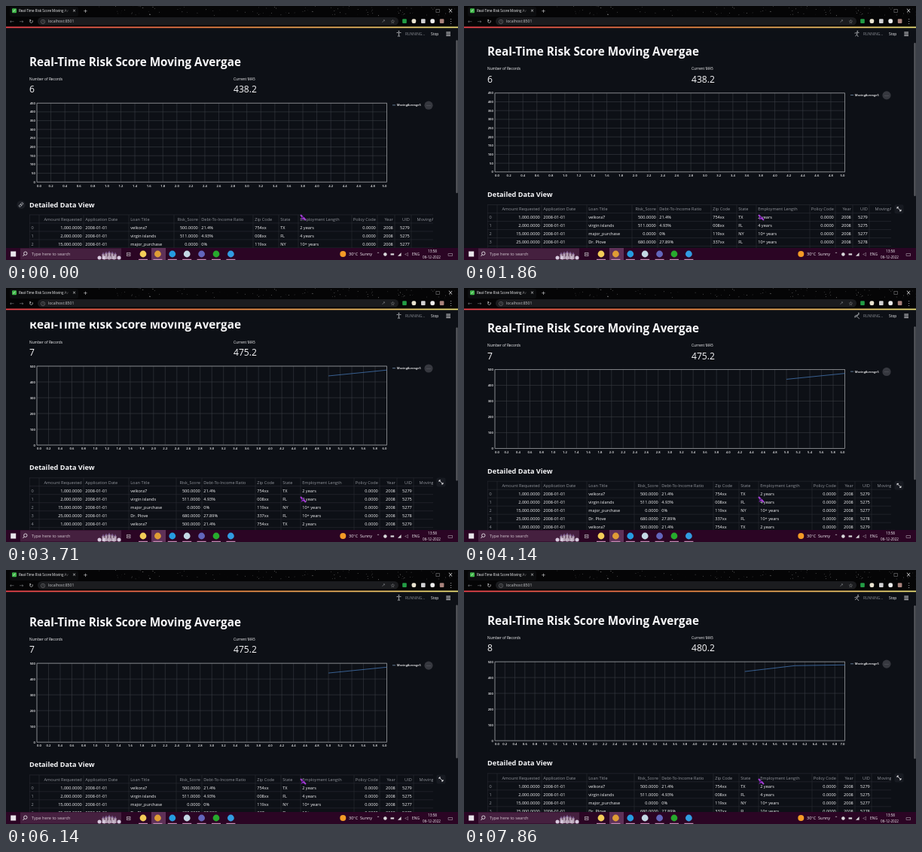
These frames come from a looping animation (600 px wide and 338 px high, 8000 ms). An HTML page with a canvas:

```html
<!DOCTYPE html>
<html lang="en">
<head>
<meta charset="utf-8">
<title>Risk score dashboard</title>
<style>
html, body { margin: 0; width: 100%; height: 100%; overflow: hidden; background: #0d1016; }
canvas { display: block; width: 100vw; height: 100vh; }
</style>
</head>
<body>
<canvas id="stage"></canvas>
<script>
const W = 600, H = 338, LOOP = 8000, STEPS = 56;
const BG = '#0d1016', WHITE = '#f8f8fa', GRAY = '#92959c', RULE = '#2a2d35';
const canvas = document.getElementById('stage');
const ctx = canvas.getContext('2d');
const ratio = window.devicePixelRatio || 1;
canvas.width = W * ratio;
canvas.height = H * ratio;
ctx.scale(ratio, ratio);

// Scroll turning points: [step, y]
const scrollKeys = [[0, 0], [9, -6.6], [19, -23.5], [26, -25.2], [34, -13.3], [43, -5.1], [48, -7.1], [STEPS, -7.1]];
const averages = [438.2, 475.2, 480.2];

const headings = 'Amount Requested|Application Date|Loan Title|Risk_Score|Debt-To-Income Ratio|Zip Code|State|Employment Length|Policy Code|Year|UID|MovingAverage5'.split('|');
const records = [
  '1,000.0000|2008-01-01|velkora7|500.0000|21.4%|754xx|TX|2 years|0.0000|2008|5279',
  '2,000.0000|2008-01-01|virgin islands|511.0000|4.93%|008xx|FL|4 years|0.0000|2008|5275',
  '15,000.0000|2008-01-01|major_purchase|0.0000|0%|119xx|NY|10+ years|0.0000|2008|5277',
  '25,000.0000|2008-01-01|Dr. Plove|680.0000|27.89%|337xx|FL|10+ years|0.0000|2008|5278'
].map(row => row.split('|'));
const columnEdges = [44, 103, 163, 223, 257, 328, 362, 388, 459, 493, 516, 538, 591];
const isNumeric = heading => /Amount|Score|Policy|Year|UID|Average/.test(heading);

const apps = ['#f3cc58', '#df9d35', '#259be0', '#c3d8e4', '#6266bc', '#27a92d', '#319ce2'];
const extensions = ['#239c45', '#e9e3d0', '#d0d0d2', '#eeeeee', '#a9837c'];

function text(str, x, y, size, { color = WHITE, align = 'left', weight = 400 } = {}) {
  ctx.font = `${weight} ${size}px "Open Sans", "Noto Sans", sans-serif`;
  ctx.fillStyle = color;
  ctx.textAlign = align;
  ctx.fillText(str, x, y + size * 0.36);
}

function glyph(symbol, x, y, size = 7, color = '#d8d8da') {
  ctx.font = `${size}px "DejaVu Sans", sans-serif`;
  ctx.fillStyle = color;
  ctx.textAlign = 'center';
  ctx.fillText(symbol, x, y + size * 0.36);
}

function rect(x, y, w, h, color, radius = 0) {
  ctx.fillStyle = color;
  ctx.beginPath();
  ctx.roundRect(x, y, w, h, radius);
  ctx.fill();
}

const dot = (x, y, r, color) => rect(x - r, y - r, 2 * r, 2 * r, color, r);

function line(color, width, ...points) {
  ctx.strokeStyle = color;
  ctx.lineWidth = width;
  ctx.beginPath();
  for (const [x, y] of points) ctx.lineTo(x, y);
  ctx.stroke();
}

function gradient(x0, x1, ...colors) {
  const fill = ctx.createLinearGradient(x0, 0, x1, 0);
  colors.forEach((color, i) => fill.addColorStop(i / (colors.length - 1), color));
  return fill;
}

function scrollAt(step) {
  const i = scrollKeys.findIndex(key => key[0] > step);
  const [s0, y0] = scrollKeys[i - 1], [s1, y1] = scrollKeys[i];
  return y0 + (y1 - y0) * (step - s0) / (s1 - s0);
}

function drawBrowser() {
  rect(0, 0, W, 28, '#050506');
  let seed = 7;
  const random = () => (seed = seed * 16807 % 2147483647) / 2147483647;
  for (let i = 0; i < 120; i++) {
    dot(W * (1 - 0.8 * random() ** 1.3), random() * 13, 0.45, `rgba(255,255,255,${random() * 0.7})`);
  }
  rect(5, 1, 91, 13, '#0c0d0f', 3);
  rect(8, 3.2, 6, 6, '#3fb649', 1);
  glyph('✓', 11, 6.2, 5.5, '#fff');
  text('Real-Time Risk Score Moving Av', 17, 6.3, 4.5);
  rect(74, 2, 13, 9, gradient(74, 86, '#0c0d0f00', '#0c0d0f'));
  glyph('×', 90.5, 6.3, 6);
  glyph('+', 105.5, 6.3);
  glyph('□', 573, 6.3, 6);
  glyph('×', 590, 6.3, 8);

  rect(42, 15, 479, 10.5, '#1b1c1f', 5.2);
  glyph('←', 8, 20, 7, '#77797d');
  glyph('→', 20.5, 20, 7, '#77797d');
  glyph('↻', 33.5, 20);
  glyph('ⓘ', 49, 20, 5.5);
  text('localhost:8501', 56, 20, 5.1, { color: '#c5c6c9' });
  glyph('↗', 501, 20, 6, '#888a8e');
  glyph('☆', 513.3, 20);
  extensions.forEach((color, i) => rect(526.2 + i * 12.4, 17.3, 5.6, 5.6, color, 1 + i % 2));
  glyph('⋮', 590.5, 20, 8);
}

function drawRunner(step) {
  const x = 521.5, y = 37, color = '#a5a7ac';
  const stride = Math.max(0, Math.sin(step * Math.PI * 2 / 9));
  const shoulder = [x + stride * 1.6, y - 1.5], hip = [x, y + 0.8];
  dot(x + stride * 2.4, y - 3.3, 0.9, color);
  line(color, 1, shoulder, hip);
  for (const side of [-1, 1]) {
    line(color, 0.9, shoulder, [x + side * 3, y - 1.5 + stride * (1 - side)]);
    line(color, 0.9, hip, [x + side * (1 + stride * 2.4), y + 4 - stride * (1 - side)]);
  }
}

function drawHeader(step) {
  rect(0, 28, W, 17.5, BG);
  rect(0, 27.6, W, 1.6, gradient(0, W, '#f0434d', '#f08a45', '#eee278'));
  drawRunner(step);
  text('RUNNING...', 530, 37.3, 4.85, { color: '#898c93' });
  text('Stop', 564, 37, 4.9, { weight: 500 });
  for (const y of [35, 37.2, 39.4]) line(WHITE, 0.9, [584.3, y], [590, y]);
}

function drawChart(top, count) {
  const left = 41, right = 505.5, height = 105;
  const bottom = top + height, maxX = count - 1;
  const [maxY, stepY] = count > 6 ? [500, 100] : [450, 50];
  const px = v => left + (right - left) * v / maxX;
  const py = v => bottom - height * v / maxY;
  for (let v = 0; v <= maxY; v += stepY) {
    line('#3a3d44', 0.6, [left, py(v)], [right, py(v)]);
    text(v, 38.8, py(v), 4.2, { weight: 600, align: 'right' });
  }
  const ticks = maxX * 5;
  for (let i = 0; i <= ticks; i++) {
    const x = px(i / 5);
    line('#3a3d44', 0.6, [x, top], [x, bottom]);
    const align = i === 0 ? 'left' : i === ticks ? 'right' : 'center';
    text((i / 5).toFixed(1), x, bottom + 4.8, 4.2, { weight: 600, align });
  }
  ctx.strokeStyle = '#a4a6aa';
  ctx.lineWidth = 0.7;
  ctx.strokeRect(left, top, right - left, height);
  line('#4374b0', 0.8, ...averages.slice(0, count - 5).map((v, i) => [px(5 + i), py(v)]));
  line('#86a5c8', 0.7, [513, top + 2.7], [517, top + 2.7]);
  text('MovingAverage5', 518.8, top + 2.7, 4, { weight: 600 });
  dot(561, top + 3, 5.6, '#36383f');
  glyph('…', 561, top + 1.5, 6, '#85878d');
}

function drawTable(top, count) {
  const rowHeight = 11, size = 5.6, pad = 2.2;
  const edges = columnEdges.map((x, i) => i > 2 && count > 6 ? x + 3 : x);
  ctx.save();
  ctx.beginPath();
  ctx.rect(31, top - 1, 536, 100);
  ctx.clip();
  for (const x of [31.3, ...edges]) line(RULE, 0.6, [x, top], [x, H]);
  for (let r = 0; r < 7; r++) {
    const y = top + r * rowHeight;
    const style = r ? { weight: 500 } : { color: GRAY };
    const cells = r ? records[(r - 1) % records.length] : headings;
    line(RULE, 0.6, [31, y], [567, y]);
    if (r) text(r - 1, 33.6, y + 5.8, size, { color: GRAY });
    cells.forEach((cell, i) => {
      const numeric = isNumeric(headings[i]);
      const x = numeric ? edges[i + 1] - pad : edges[i] + pad;
      text(cell, x, y + 5.8, size, { ...style, align: numeric ? 'right' : 'left' });
    });
  }
  ctx.restore();
}

function drawLinkButton(x, y) {
  dot(x, y, 5.6, '#1b1e25');
  ctx.save();
  ctx.translate(x, y);
  ctx.rotate(-Math.PI / 4);
  ctx.strokeStyle = '#b5b7bc';
  ctx.lineWidth = 0.8;
  for (const dx of [-3.3, -0.3]) {
    ctx.beginPath();
    ctx.roundRect(dx, -1.2, 3.6, 2.4, 1.2);
    ctx.stroke();
  }
  ctx.restore();
}

function drawExpandButton(x, y) {
  rect(x - 6, y - 6, 12, 12, '#171a21', 2);
  line(WHITE, 0.8, [x - 2.5, y - 2.5], [x + 2.5, y + 2.5]);
  for (const d of [-2.5, 2.5]) line(WHITE, 0.9, [x + d, y + d * 0.2], [x + d, y + d], [x + d * 0.2, y + d]);
}

function drawPage(step) {
  const y = scrollAt(step);
  const count = step < 25 ? 6 : step < 50 ? 7 : 8;
  text('Real-Time Risk Score Moving Avergae', 31, 74.2 + y, 15.25, { weight: 700 });
  text('Number of Records', 31, 97 + y, 4.85);
  text(count, 31, 111 + y, 12.1);
  text('Current MA5', 302, 97 + y, 4.85);
  text(averages[count - 6].toFixed(1), 302, 111 + y, 12.1);
  drawChart(129.2 + y, count);
  text('Detailed Data View', 31, 264.3 + y, 9.15, { weight: 700 });
  drawTable(277.9 + y, count);
  if (step < 4) drawLinkButton(20, 264.5 + y);
  else drawExpandButton(577.5, 283.6 + y);
  rect(597.4, 45 - y * 0.3, 2.2, 204, '#5c5e64', 1);
}

function drawCursor() {
  glyph('➤', 394, 282, 9, '#7b20ae');
  line('#a63fd6', 2, [391, 278], [398, 285]);
  dot(394, 281, 0.9, '#3c0a60');
}

function drawTaskbar() {
  const y = 330;
  rect(0, 322, W, 16, '#2b0524');
  rect(6.2, y - 3.5, 7, 7, '#e9e4ea');
  rect(19, 322.5, 134, 15, '#45203f');
  ctx.strokeStyle = WHITE;
  ctx.lineWidth = 0.8;
  ctx.beginPath();
  ctx.arc(25.8, y - 0.8, 2.2, 0, Math.PI * 2);
  ctx.stroke();
  line(WHITE, 0.8, [24.2, y + 0.8], [22.5, y + 3]);
  text('Type here to search', 34, y + 0.2, 5.65, { color: '#d3c8d0' });

  // Castle illustration in the search box
  for (let i = 0; i < 5; i++) {
    const x = 129 + i * 4, top = y - 2 * Math.sin(i * Math.PI / 4);
    dot(124 + i * 6.5, 335, 2.5, '#d9cbe0');
    rect(x - 1.5, top, 3, 337 - top, '#b9a6b8');
    glyph('▲', x, top - 1, 4, '#7c5b91');
  }

  glyph('⊟', 162.5, y, 8);
  rect(193, 322, 19, 16, '#5f3158');
  apps.forEach((color, i) => {
    const x = 182 + i * 19.4;
    dot(x, y, 4.4, color);
    rect(x - 6, 336.8, 12, 1.2, '#c58ab4');
  });

  dot(447.3, y, 4, '#f49b26');
  text('30°C', 455, y + 0.2, 5.5);
  text('Sunny', 470, y + 0.2, 5.5);
  [...'⌃●▬◢◁'].forEach((symbol, i) => glyph(symbol, 494 + i * 9.4, y, 6));
  text('ENG', 539, y + 0.2, 4.9);
  text('13:58', 566, 326.4, 4.7, { align: 'center' });
  text('06-12-2022', 565, 334, 4.6, { align: 'center' });
  glyph('▭', 590, y, 8);
}

function draw(now) {
  const step = Math.floor((now % LOOP + 8) / (LOOP / STEPS)) % STEPS;
  rect(0, 0, W, H, BG);
  drawPage(step);
  drawBrowser();
  drawHeader(step);
  drawCursor();
  drawTaskbar();
  requestAnimationFrame(draw);
}

requestAnimationFrame(draw);
</script>
</body>
</html>
```
